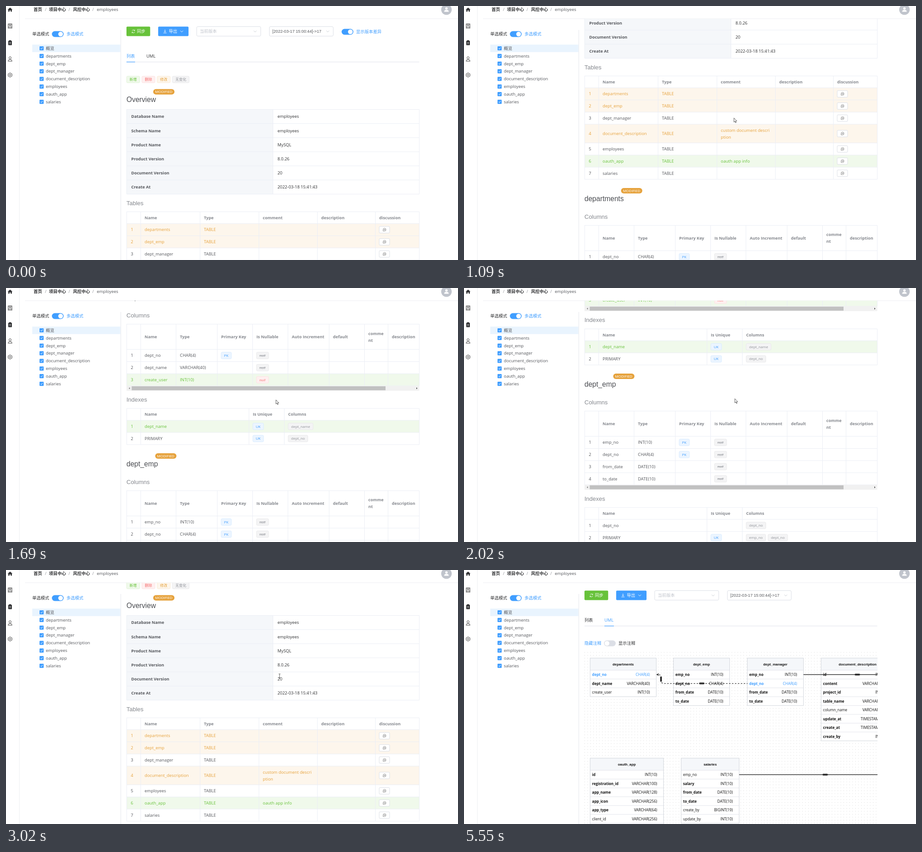
These frames come from a looping animation (998 by 561 pixels, 5.61 s). An HTML page:

```html
<!DOCTYPE html>
<html lang="zh">
<head>
<meta charset="utf-8">
<title>employees</title>
<style>
html, body { margin: 0; width: 100%; height: 100%; overflow: hidden; background: #fff; }
svg { display: block; }
text { font: 9.35px 'Open Sans', 'Noto Sans CJK SC', 'Noto Sans', sans-serif; fill: #55575c; white-space: pre; }
text.b { font-weight: 700; font-size: 9.15px; }
text.crumb { font-weight: 700; fill: #303133; }
text.s { font-size: 8px; }
text.null { font-size: 8px; font-style: italic; }
text.strike { text-decoration: line-through; }
text.input { font: 9.15px 'Liberation Sans', Arial, sans-serif; }
text.h1 { font: 15.6px 'Liberation Sans', Arial, sans-serif; fill: #4b4d52; }
text.h2 { font: 13px 'Liberation Sans', Arial, sans-serif; fill: #85888e; }
text.entity { font: 700 7.8px 'Liberation Sans', Arial, sans-serif; fill: #111; text-anchor: middle; }
.col text { font-size: 8.05px; fill: #111; }
.col .type { font-size: 8.3px; text-anchor: end; }
.col.key .name { font-weight: 700; }
.col.hot text { fill: #409eff; }
.edge { fill: none; stroke: #333; stroke-width: 1.4; }
.edge.hot { stroke-dasharray: 3.25; }
</style>
</head>
<body>
<svg width="998" height="561" viewBox="0 0 998 561">
  <defs>
    <clipPath id="view"><rect x="260" y="28" width="738" height="533"/></clipPath>
    <clipPath id="graph"><rect x="266" y="181" width="647" height="380"/></clipPath>
    <pattern id="dots" x="266" y="181.5" width="6.5" height="6.5" patternUnits="userSpaceOnUse">
      <rect width=".8" height=".8" fill="#b4b4b4"/>
    </pattern>
  </defs>
  <g id="frame"></g>
  <g clip-path="url(#view)"><g id="page">
    <g id="toolbar"></g>
    <g id="list"></g>
    <g id="uml" clip-path="url(#graph)"></g>
    <g id="umlBar"></g>
  </g></g>
  <g id="cursor" fill="#fff" stroke="#333" stroke-width=".8">
    <path id="arrow" d="M0 0V9.2L2.1 7.2 3.7 10.6 5 10 3.5 6.7H6.4Z"/>
    <path id="hand" d="M-1 .6Q0-.8 1 .6V4.6L5 5.6Q6 6 5.8 7.4L5 11.5H0L-3.2 7.4Q-2.8 5.6-1 7Z"/>
    <path id="beam" fill="none" d="M-2-4.5H-.5L0-4 .5-4.5H2M0-4V4M-2 4.5H-.5L0 4 .5 4.5H2"/>
  </g>
</svg>
<script>
const LOOP = 5610, TICK = 66.5, LAST = 5550;
const BLUE = '#409eff', LINE = '#ebeef5', EDGE = '#dcdfe6', DARK = '#303133';
const TONES = {
  info: ['#ecf5ff', '#d9ecff', BLUE],
  add: ['#f0f9eb', '#e1f3d8', '#67c23a'],
  bad: ['#fef0f0', '#fde2e2', '#f56c6c'],
  mod: ['#fdf6ec', '#faecd8', '#e6a23c'],
  grey: ['#f4f4f5', '#e9e9eb', '#909399'],
};
const $ = id => document.getElementById(id);
const pen = document.createElement('canvas').getContext('2d');
const measure = (s, font) => { pen.font = font; return pen.measureText(s).width; };

// Drawing helpers; text is centred vertically on y
const text = (x, y, s, cls = '', fill = '') => s.split('\n').map((line, i, all) =>
  `<text x="${x}" y="${y + (i - (all.length - 1) / 2) * 15}" dy=".36em" class="${cls}"` +
  `${fill && ` style="fill:${fill}"`}>${line.replace('>', '&gt;')}</text>`).join('');
const rect = (x, y, w, h, fill, r = 0, stroke = 'none') =>
  `<rect x="${x}" y="${y}" width="${w}" height="${h}" rx="${r}" fill="${fill}" stroke="${stroke}"/>`;
const path = (d, stroke, width = 1, fill = 'none') =>
  `<path d="${d}" fill="${fill}" stroke="${stroke}" stroke-width="${width}"/>`;
const circle = (x, y, r, fill, stroke = 'none') =>
  `<circle cx="${x}" cy="${y}" r="${r}" fill="${fill}" stroke="${stroke}"/>`;
const chevron = (x, y, color) => path(`M${x - 3} ${y - 1.5}l3 3 3-3`, color, .9);
const toggle = (x, y, on) => rect(x, y - 6.5, 26, 13, on ? BLUE : EDGE, 6.5) +
  circle(x + (on ? 19.3 : 6.7), y, 5.2, '#fff');
const tagWidth = s => measure(s, "8px 'Open Sans','Noto Sans CJK SC',sans-serif") + 13;
const tag = (x, y, s, tone, cls = 's') => {
  const [bg, border, ink] = TONES[tone];
  return rect(x, y - 7.3, tagWidth(s), 14.6, bg, 2.5, border) + text(x + 6.5, y, s, cls, ink);
};

function buildFrame() {
  let out = path('M29.5 0V561M42 28H998', '#eceef1') + path('M253.5 53V561', '#e4e7ed');
  out += path('M3.8 8 9 3.4 14.2 8H12.9V12.6H10.2V9.4H7.8V12.6H5.1V8Z', 'none', 0, DARK);
  out += path('M5 39.5H13V49H5ZM5 46.5H13M7.5 40V43.5H10.5V40', '#444', 1.1);
  out += rect(5, 76.8, 8, 9.7, DARK, 1) + rect(7, 75.6, 4, 2.4, DARK) + path('M7 80.5H11M7 83H11', '#fff', .8);
  out += circle(9, 114.5, 2.5, 'none', '#444') + path('M4.6 122Q5 118 9 118T13.4 122Z', '#444');
  out += path('M9 147.6 13.2 150V154.8L9 157.2 4.8 154.8V150Z', '#444') + circle(9, 152.4, 1.7, 'none', '#444');
  out += circle(972.5, 8, 11.6, '#c0c4cc') + circle(972.5, 5.3, 2.6, '#fff') +
    path('M967.5 12.8Q967.5 8.6 972.5 8.6T977.5 12.8Z', 'none', 0, '#fff');
  [[61, '首页'], [95, '项目中心'], [148, '风控中心']].forEach(([x, s]) => out += text(x, 8, s, 'crumb'));
  [86, 138, 190.5].forEach(x => out += text(x, 8, '/', '', '#909399'));
  out += text(200.5, 8, 'employees');
  out += text(58, 62, '单选模式', '', DARK) + toggle(101.3, 62, true) + text(133.5, 62, '多选模式', '', BLUE);
  out += rect(58, 85.3, 194.5, 16.5, '#e9f4fe');
  'all departments dept_emp dept_manager document_description employees oauth_app salaries'.split(' ')
    .forEach((s, i) => {
      const y = 93.5 + i * 16.87;
      out += rect(74, y - 4.6, 9.2, 9.2, BLUE, 1.3) + path(`M76.3 ${y}l1.7 1.8 3-3.6`, '#fff');
      out += text(88, y, i ? s : '概览');
    });
  return out;
}

function buildToolbar() {
  let out = rect(266, 45.6, 52.3, 20.9, '#67c23a', 2) + text(289, 56, '同步', '', '#fff');
  out += path('M278.4 54.6A3.2 3.2 0 0 1 284 54.2M284.3 57.2A3.2 3.2 0 0 1 278.6 58M284.3 52.4V54.6H282.3M278.2 59.8V57.6H280.2', '#fff', .9);
  out += rect(336, 45.6, 67, 20.9, BLUE, 2) + text(359.5, 56, '导出', '', '#fff') + chevron(388, 56, '#fff');
  out += path('M351 52V57.4M348.8 55.3 351 57.5 353.2 55.3M347.5 59.5H354.5', '#fff', .9);
  out += rect(421, 45.5, 141.5, 21, '#fff', 2.5, EDGE) + text(428, 56, '当前版本', '', '#c0c4cc') + chevron(550, 56, '#c0c4cc');
  out += rect(581.5, 45.5, 141, 21, '#fff', 2.5, EDGE) + text(588, 56, '[2022-03-17 15:00:44]->17', 'input') + chevron(710.5, 56, '#c0c4cc');
  out += rect(266, 123, 646.5, 1.2, '#e4e7ed') + `<rect id="bar" y="123" height="1.2" fill="${BLUE}"/>`;
  return out + `<g id="tabList">${text(266, 111, '列表')}</g><g id="tabUml">${text(310, 111, 'UML')}</g>`;
}

function buildList() {
  let out = '', y = 0;
  const pk = (x, y) => tag(x, y, 'PK', 'info'), uk = (x, y) => tag(x, y, 'UK', 'info');
  const no = (x, y) => tag(x, y, 'null', 'grey', 'null strike');
  const newNull = (x, y) => tag(x, y, 'null', 'bad', 'null');
  const talk = (x, y) => rect(x, y - 7.3, 23, 14.6, '#fff', 2, EDGE) +
    path(`M${x + 8.6} ${y + 3}V${y}a3.2 3.2 0 1 1 3.2 3.1Z`, '#777', .8) +
    path(`M${x + 10} ${y}h3.6`, '#777', 1.2);
  const tags = (...names) => (x, y) => names.map(s => {
    const svg = tag(x, y, s, 'grey');
    x += tagWidth(s) + 5;
    return svg;
  }).join('');

  const title = s => {
    const x = 260 + measure(s, "15.6px 'Liberation Sans',Arial,sans-serif");
    out += text(266, y, s, 'h1') + rect(x, y - 23.2, 47, 12, '#e6a23c', 6) + text(x + 4.2, y - 17.2, 'MODIFIED', 's', '#fff');
  };
  // Each row is [tone, ...cells]; numbering is added in the first column
  const table = (cols, head, rows, headHeight = 26.2) => {
    const top = y;
    let grid = `M266 ${y}H912.5`;
    head.forEach((s, i) => out += text(cols[i + 1] + 8.5, y + headHeight / 2, s, 'b', '#85888e'));
    y += headHeight;
    rows.forEach(([tone, ...cells], i) => {
      const h = cells.some(c => typeof c === 'string' && c.includes('\n')) ? 41.3 : 26.8;
      const [bg, , ink] = TONES[tone] || ['none', '', ''];
      const mid = y + h / 2;
      out += rect(266, y, 646.5, h, bg);
      [String(i + 1), ...cells].forEach((c, k) => {
        const x = cols[k] + (k ? 8.5 : 9);
        out += typeof c === 'function' ? c(x, mid) : text(x, mid, c, '', ink);
      });
      grid += `M266 ${y}H912.5`;
      y += h;
    });
    out += path(grid + `M266 ${y}H912.5` + cols.map(x => `M${x} ${top}V${y}`).join(''), LINE);
  };
  const section = (name, columns, indexes) => {
    y += 42.3;
    title(name);
    out += text(266, y + 40, 'Columns', 'h2');
    y += 59.5;
    table([266.5, 297.5, 375.5, 466.5, 544.5, 622.5, 713.5, 791.5, 843.5, 912.5],
      ['Name', 'Type', 'Primary Key', 'Is Nullable', 'Auto Increment', 'default', 'comme\nnt', 'description'], columns, 55.8);
    out += rect(266, y, 646.5, 10.8, '#f1f1f1') + rect(277.5, y + 1, 560.5, 8.8, '#c1c1c1');
    out += path(`M273.5 ${y + 3.3}v4.2l-2.4-2.1Z`, 'none', 0, '#777') + path(`M906 ${y + 3.3}v4.2l2.4-2.1Z`, 'none', 0, '#444');
    y += 10.8;
    out += text(266, y + 19.7, 'Indexes', 'h2');
    y += 39.2;
    table([266.5, 297.5, 536.5, 614.5, 912.5], ['Name', 'Is Unique', 'Columns'], indexes);
  };

  out += toggle(741, 57, true) + text(773, 57, '显示版本差异', '', BLUE);
  ['新增', '删除', '修改', '无变化'].forEach((s, i) =>
    out += tag(266.3 + i * 33.7, 162.3, s, ['add', 'bad', 'mod', 'grey'][i]));
  y = 206.7;
  title('Overview');
  out += rect(266, 228.5, 323.5, 187, '#f5f7fa');
  [['Database Name', 'employees'], ['Schema Name', 'employees'], ['Product Name', 'MySQL'],
    ['Product Version', '8.0.26'], ['Document Version', '20'], ['Create At', '2022-03-18 15:41:43']]
    .forEach(([label, value], i) => {
      const top = 228.5 + i * 31.15;
      out += path(`M266 ${top}H912.5`, LINE);
      out += text(276.5, top + 15.6, label, 'b') + text(599.5, top + 15.6, value, '', DARK);
    });
  out += path('M266.5 228.5V415.4H912.5V228.5M589.5 228.5V415.4', LINE);
  out += text(266, 435.3, 'Tables', 'h2');
  y = 454.5;
  const entry = (name, tone, comment = '') => [tone, name, 'TABLE', comment, '', talk];
  table([266.5, 297.5, 428.5, 558.5, 687.5, 815.5, 912.5], ['Name', 'Type', 'comment', 'description', 'discussion'], [
    entry('departments', 'mod'), entry('dept_emp', 'mod'), entry('dept_manager'),
    entry('document_description', 'mod', 'custom document descri\nption'),
    entry('employees'), entry('oauth_app', 'add', 'oauth app info'), entry('salaries'),
  ]);
  section('departments',
    [['', 'dept_no', 'CHAR(4)', pk, no], ['', 'dept_name', 'VARCHAR(40)', '', no], ['add', 'create_user', 'INT(10)', '', newNull]],
    [['add', 'dept_name', uk, tags('dept_name')], ['', 'PRIMARY', uk, tags('dept_no')]]);
  section('dept_emp',
    [['', 'emp_no', 'INT(10)', pk, no], ['', 'dept_no', 'CHAR(4)', pk, no],
      ['', 'from_date', 'DATE(10)', '', no], ['', 'to_date', 'DATE(10)', '', no]],
    [['', 'dept_no', '', tags('dept_no')], ['', 'PRIMARY', uk, tags('emp_no', 'dept_no')]]);
  return out;
}

function buildUml() {
  // A leading * marks a required column
  const entity = (x, y, w, name, columns) => {
    const rows = columns.split(' '), h = 26.8 + rows.length / 2 * 19.5;
    let out = rect(x, y, w, h, '#fff') + rect(x, y, w, 26.8, '#f5f7fa') + text(x + w / 2, y + 13.4, name, 'entity');
    for (let i = 0; i < rows.length; i += 2) {
      const col = rows[i].replace('*', ''), top = y + 26.8 + i / 2 * 19.5;
      out += path(`M${x} ${top}h${w}`, EDGE, .8);
      out += `<g id="${name}.${col}" class="col${rows[i][0] === '*' ? ' key' : ''}">` +
        text(x + 4.3, top + 10.2, col, 'name') + text(x + w - 14, top + 10.2, rows[i + 1], 'type') + '</g>';
    }
    return out + rect(x, y, w, h, 'none', 0, '#d3d7dd');
  };
  const edge = (id, d) => `<path id="${id}" class="edge" d="${d}"/>`;
  const grip = (x, y, w, h) => rect(x - w / 2, y - h / 2, w, h, '#333', 2);
  const staff = '*emp_no INT(10) *dept_no CHAR(4) *from_date DATE(10) *to_date DATE(10)';
  return rect(266, 181, 647, 380, 'url(#dots)') +
    entity(278.5, 194.5, 146, 'departments', '*dept_no CHAR(4) *dept_name VARCHAR(40) create_user INT(10)') +
    entity(462.5, 194.5, 124, 'dept_emp', staff) +
    entity(625.5, 194.5, 124, 'dept_manager', staff) +
    entity(788.5, 194.5, 161, 'document_description', '*id INT(10) *content VARCHAR(256) *project_id INT(10) *table_name VARCHAR(256) column_name VARCHAR(256) *update_at TIMESTAMP(19) *create_at TIMESTAMP(19) *create_by INT(10)') +
    entity(278.5, 415.5, 162, 'oauth_app', '*id INT(10) *registration_id VARCHAR(100) *app_name VARCHAR(128) *app_icon VARCHAR(256) *app_type VARCHAR(64) client_id VARCHAR(256) client_secret VARCHAR(256)') +
    entity(479.5, 415.5, 128, 'salaries', '*emp_no INT(10) *salary INT(10) *from_date DATE(10) *to_date DATE(10) create_by BIGINT(19) update_by INT(10)') +
    edge('deptEdge', 'M626 250.6H441.5Q435 250.6 435 244.1V237.5Q435 231 429 231') +
    path('M424.3 231 430.3 228 429 231 430.3 234Z', 'none', 0, '#333') +
    edge('empEdge', 'M749.5 231H913') + edge('payEdge', 'M607.5 452H913') +
    grip(435, 241, 4, 12) + grip(525, 250.6, 12, 4) + grip(868.5, 231, 12, 4) + grip(797.5, 452, 12, 4);
}

$('frame').innerHTML = buildFrame();
$('toolbar').innerHTML = buildToolbar();
$('list').innerHTML = buildList();
$('uml').innerHTML = buildUml();
$('umlBar').innerHTML = text(266, 162, '隐藏注释', '', BLUE) + toggle(309, 162, false) + text(341, 162, '显示注释', '', DARK);

// Keyframes: [time, values...]
const scrollKeys = [[563, 0], [629, 18], [762, 106.5], [1360, 454.5], [1440, 454.5], [1759, 770],
  [1826, 770], [2025, 880.5], [2092, 893], [2358, 893], [3023, 128], [3223, 0]];
const cursorKeys = [[230, 945, 538], [496, 596, 248], [1360, 596, 247], [1826, 596, 247], [2025, 598, 244.5],
  [2159, 598, 244.5], [2292, 601, 243], [2690, 604, 234], [3223, 604, 234], [3820, 314.5, 110.5], [4160, 314.5, 110.5],
  [4420, 640, 443], [4530, 640, 443], [4680, 560, 249], [4800, 560, 249], [5350, 919, 527]];

function at(keys, t) {
  const i = keys.findIndex(k => k[0] > t);
  if (i < 1) return keys[i ? keys.length - 1 : 0].slice(1);
  const [a, b] = [keys[i - 1], keys[i]], p = (t - a[0]) / (b[0] - a[0]);
  return a.slice(1).map((v, k) => v + (b[k + 1] - v) * p);
}
const show = (id, on) => $(id).style.display = on ? '' : 'none';
const hot = (on, ...ids) => ids.forEach(id => $(id).classList.toggle('hot', on));
const paint = (id, on) => $(id).firstChild.style.fill = on ? BLUE : DARK;

function draw() {
  const now = performance.now() % LOOP;
  const t = LAST - TICK * Math.max(0, Math.ceil((LAST - now - 12) / TICK));
  const uml = t > 3940;
  const [x, y] = at(cursorKeys, t);

  $('page').setAttribute('transform', `translate(0 ${-at(scrollKeys, t)[0]})`);
  show('list', !uml);
  show('uml', uml);
  show('umlBar', uml);

  const p = Math.min(1, Math.max(0, (t - 3914) / 300)), slide = p * p * (3 - 2 * p);
  $('bar').setAttribute('x', 266 + 44 * slide);
  $('bar').setAttribute('width', 19 + 2 * slide);
  paint('tabList', !uml);
  paint('tabUml', t > 3800);

  const onPay = t > 4400 && t < 4550, onDept = t > 4670;
  hot(onPay, 'payEdge', 'salaries.emp_no');
  hot(onDept, 'deptEdge', 'departments.dept_no', 'dept_manager.dept_no');
  $('salaries.emp_no').classList.toggle('key', t < 4550);
  ['payEdge', 'deptEdge'].forEach(id => $(id).style.strokeDashoffset = -t * .022);

  const hand = (t > 3800 && t < 4200) || onPay || (onDept && t < 4820);
  const beam = t > 2680 && t < 3240;
  show('cursor', t > 225 && t < 5400);
  show('hand', hand);
  show('beam', beam);
  show('arrow', !hand && !beam);
  $('cursor').setAttribute('transform', `translate(${x} ${y})`);
  requestAnimationFrame(draw);
}
draw();
</script>
</body>
</html>
```
